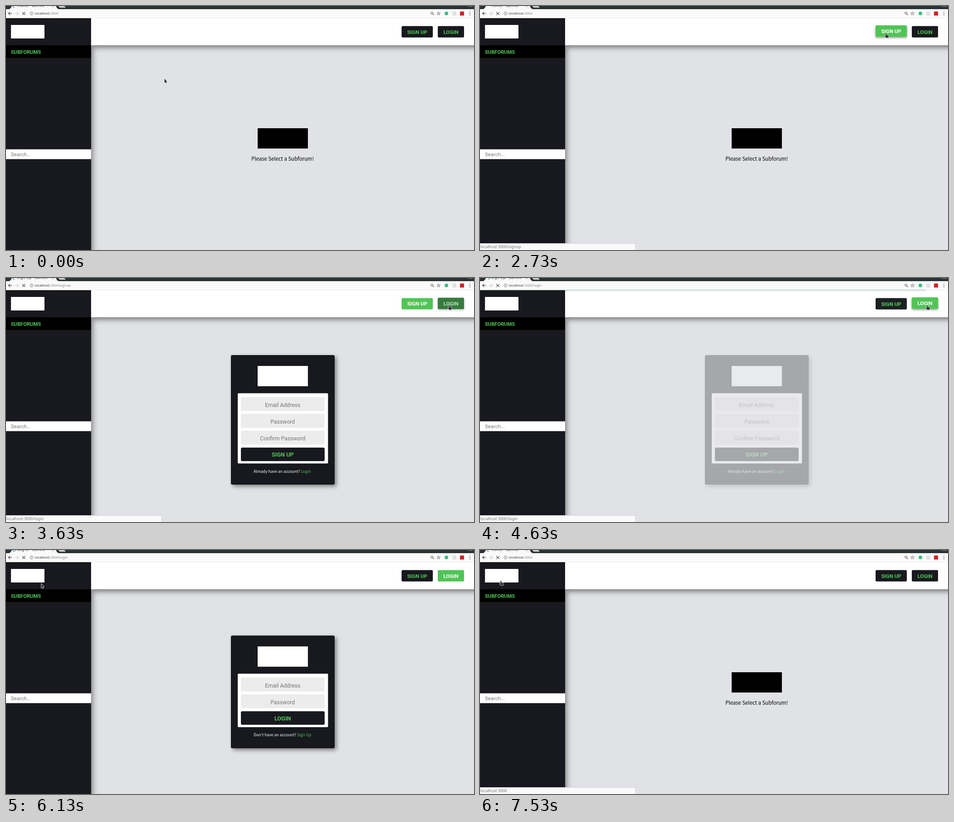
Recreate the animation shown at these times as an HTML page with a canvas. Size 1034 by 541 pixels, loop 7.56 s.

```html
<!DOCTYPE html>
<html lang="en">
<head>
<meta charset="utf-8">
<title>Forum tour</title>
<style>
html, body { margin: 0; width: 100%; height: 100%; overflow: hidden; }
canvas { display: block; width: 1034px; height: 541px; }
</style>
</head>
<body>
<canvas id="stage" width="1034" height="541"></canvas>
<script>
const W = 1034, H = 541, LOOP = 7560;
const INK = '#18191e', GREEN = '#50c556', WHITE = '#fff', GREY = '#e1e2e5';
const UI = 'Roboto, sans-serif';
const BODY = '"Noto Sans CJK JP", "Noto Sans CJK SC", "Noto Sans", sans-serif';
const CHROME = '"Noto Sans", sans-serif';

const stage = document.getElementById('stage').getContext('2d');
let c = stage;

// ---------- timing ----------
const clamp = (v, a = 0, b = 1) => Math.min(b, Math.max(a, v));

// CSS "ease": cubic-bezier(.25, .1, .25, 1)
function ease(x) {
  if (x <= 0) return 0;
  if (x >= 1) return 1;
  const bez = (s, a, b) => 3 * a * s * (1 - s) ** 2 + 3 * b * s * s * (1 - s) + s ** 3;
  let lo = 0, hi = 1;
  for (let i = 0; i < 20; i++) {
    const mid = (lo + hi) / 2;
    if (bez(mid, .25, .25) < x) lo = mid; else hi = mid;
  }
  return bez(lo, .1, 1);
}

// Level of a 200 ms transition switched on at a and off at b
function level(t, [a, b]) {
  if (t < b) return ease((t - a) / 200);
  return ease((b - a) / 200) * (1 - ease((t - b) / 200));
}
const peak = (t, spans) => Math.max(...spans.map(s => level(t, s)));
const within = (t, spans) => spans.some(([a, b]) => t >= a && t < b);

const OVER_SIGNUP = [[2170, 3490], [5030, 5070]];
const OVER_LOGIN = [[3565, 5010]];
const OVER_LOGO = [[6150, 9999]];
const LINKS = [...OVER_SIGNUP, ...OVER_LOGIN, ...OVER_LOGO];

const ROUTES = [
  { at: -9999, page: 'home', path: '', title: 'Home' },
  { at: 2740, page: 'signup', path: '/signup', title: 'Sign Up' },
  { at: 4485, page: 'login', path: '/login', title: 'Log In' },
  { at: 6485, page: 'home', path: '', title: 'Home' }
];
const STATUS = [
  [2170, 3565, '/signup'], [3565, 5030, '/login'],
  [5030, 5560, '/signup'], [6150, LOOP, '']
];

// time, x, y
const PATH = [
  [0, 350, 161], [70, 350, 161], [430, 408, 196], [800, 484, 212],
  [1150, 620, 234], [1570, 780, 200], [2000, 880, 100], [2170, 893, 70],
  [2330, 897, 60], [3250, 897, 60], [3490, 943, 61], [3565, 955, 61],
  [3630, 979, 60], [3830, 988, 60], [4900, 988, 60], [5010, 954, 62],
  [5030, 942, 63], [5070, 873, 66], [5230, 508, 76], [5440, 270, 95],
  [5640, 178, 92], [6150, 75, 74], [6400, 46, 68], [LOOP, 46, 68]
];

// Monotone cubic through PATH
function along(t, k) {
  const rate = i => (PATH[i + 1][k] - PATH[i][k]) / (PATH[i + 1][0] - PATH[i][0]);
  const slope = i => {
    if (i === 0 || i === PATH.length - 1) return 0;
    const a = rate(i - 1), b = rate(i);
    return a * b <= 0 ? 0 : 2 * a * b / (a + b);
  };
  let i = 0;
  while (i < PATH.length - 2 && t >= PATH[i + 1][0]) i++;
  const d = PATH[i + 1][0] - PATH[i][0], u = (t - PATH[i][0]) / d;
  const p = PATH[i][k], q = PATH[i + 1][k];
  return p + (q - p) * u * u * (3 - 2 * u)
    + d * u * (1 - u) * (slope(i) * (1 - u) - slope(i + 1) * u);
}

// ---------- drawing helpers ----------
function box(x, y, w, h, fill, r = 0) {
  c.fillStyle = fill;
  c.beginPath();
  c.roundRect(x, y, w, h, r);
  c.fill();
}
function text(str, x, y, font, fill, align = 'left') {
  c.font = font;
  c.fillStyle = fill;
  c.textAlign = align;
  c.fillText(str, x, y);
  return c.measureText(str).width;
}
function poly(pts, fill, stroke, lw = 1) {
  c.beginPath();
  pts.forEach(p => c.lineTo(p[0], p[1]));
  if (fill) { c.closePath(); c.fillStyle = fill; c.fill(); }
  if (stroke) { c.lineWidth = lw; c.strokeStyle = stroke; c.stroke(); }
}
function ring(x, y, r, stroke, lw, a = 0, b = 7) {
  c.beginPath();
  c.arc(x, y, r, a, b);
  c.lineWidth = lw;
  c.strokeStyle = stroke;
  c.stroke();
}
function dot(x, y, r, fill) {
  c.beginPath();
  c.arc(x, y, r, 0, 7);
  c.fillStyle = fill;
  c.fill();
}
function shaded(color, blur, dx, dy, draw) {
  c.save();
  c.shadowColor = color;
  c.shadowBlur = blur;
  c.shadowOffsetX = dx;
  c.shadowOffsetY = dy;
  draw();
  c.restore();
}
function mix(a, b, k) {
  return `rgb(${a.map((v, i) => Math.round(v + (b[i] - v) * k))})`;
}

// ---------- page contents ----------
function card(top, fields, label, ask, link) {
  const btn = top + 93 + 37.3 * fields.length;
  shaded('rgba(0,0,0,.45)', 10, 4, 4, () => box(497, top, 229, btn + 82 - top, '#08090b', 3));
  box(498, top + 1, 227, btn + 80 - top, INK, 2);
  box(556, top + 24, 111, 45, WHITE);
  box(512, top + 84.5, 199.5, btn + 35.3 - top - 84.5, WHITE, 2);
  fields.forEach((name, i) => {
    const y = top + 93 + 37.3 * i;
    box(519, y, 185, 31, '#ececec', 3);
    text(name, 611.3, y + 21.7, `12.2px ${UI}`, '#757575', 'center');
  });
  box(519, btn, 185, 30, INK, 3);
  text(label, 611.3, btn + 20.5, `bold 12.7px ${UI}`, GREEN, 'center');
  const font = `8.7px ${BODY}`;
  const w = text(ask, 547, btn + 55.6, font, WHITE);
  text(link, 547 + w, btn + 55.6, font, GREEN);
}

const PAGES = {
  home() {
    box(556, 271, 111, 45, '#000');
    text('Please Select a Subforum!', 611.3, 342.7, `11.4px ${BODY}`, '#000', 'center');
  },
  signup() {
    card(171, ['Email Address', 'Password', 'Confirm Password'], 'SIGN UP',
      'Already have an account? ', 'Login');
  },
  login() {
    card(189.8, ['Email Address', 'Password'], 'LOGIN', "Don't have an account? ", 'Sign Up');
  }
};

// Each page is painted on its own layer so that it fades as a whole
const layer = document.createElement('canvas');
layer.width = W;
layer.height = H;
const layerCtx = layer.getContext('2d');

function page(name, alpha) {
  if (alpha <= 0) return;
  c = layerCtx;
  c.clearRect(0, 0, W, H);
  PAGES[name]();
  c = stage;
  c.globalAlpha = alpha;
  c.drawImage(layer, 0, 0);
  c.globalAlpha = 1;
}

function button(label, x, w, hover, active) {
  const k = Math.max(hover, active), y = 44.5 - 1.4 * hover;
  const fill = mix([24, 25, 30], [80, 197, 86], k);
  shaded(`rgba(0,0,0,${.45 * hover})`, 5, 0, 2, () => box(x, y, w, 25.2, fill, 2.5));
  text(label, x + w / 2, y + 17, `bold 11.5px ${UI}`,
    mix([80, 197, 86], [255, 255, 255], k), 'center');
}

function frame(t) {
  box(188, 27, W - 188, H - 27, GREY);
  shaded('rgba(0,0,0,.55)', 13, 2, 0, () => box(-20, 87, 208, H, INK));
}

function header(t) {
  shaded('rgba(0,0,0,.6)', 13, 0, 3, () => box(188, 27, W - 168, 60, WHITE));
  button('SIGN UP', 874, 69, peak(t, OVER_SIGNUP), level(t, [2740, 4485]));
  button('LOGIN', 954, 58, peak(t, OVER_LOGIN), level(t, [4485, 6485]));
}

function sidebar() {
  box(0, 27, 188, H - 27, INK);
  box(11, 42, 74, 30, WHITE);
  box(0, 87, 188, 28, '#000');
  text('SUBFORUMS', 10.7, 105.9, `bold 11.2px ${UI}`, GREEN);
  box(0, 317.7, 188, 21.8, WHITE);
  text('Search...', 10.7, 333.2, `11.4px ${UI}`, '#757575');
}

// ---------- browser ----------
function spinner(t) {
  const turn = (t - clamp(t - 3830, 0, 300)) / 1000 * 5.2;
  ring(18, -1.5, 4.3, '#3d9d98', 1.3, turn + 1.2, turn + 4.2);
}

function browser(t, title, path) {
  box(0, 0, W, 7, '#2a3235');
  poly([[7, 7], [10, 5], [13, 0], [110, 0], [113, 5], [116, 7]], '#f8f8f8');
  poly([[115, 0], [129, 0], [132, 3.7], [119, 3.7]], '#c9cccd');
  spinner(t);
  text(title + ' - Lumvo', 25, 2.4, `8.7px ${CHROME}`, '#444');
  poly([[101, -2.5], [105, 1.7]], null, '#666', 1);
  poly([[105, -2.5], [101, 1.7]], null, '#666', 1);
  text('me', 1020, 2.4, `7.5px ${CHROME}`, '#c8cbcc');

  box(0, 7, W, 20, '#fafafa');
  box(0, 26.2, W, .8, '#e4e4e4');
  for (const [x, dir, color] of [[9, 1, '#444'], [24, -1, '#c8c8c8']]) {
    poly([[x + 4 * dir, 16.6], [x - 3.3 * dir, 16.6]], null, color, 1.2);
    poly([[x, 13], [x - 3.5 * dir, 16.6], [x, 20.2]], null, color, 1.2);
  }
  poly([[36, 13.3], [42.6, 19.9]], null, '#444', 1.2);
  poly([[42.6, 13.3], [36, 19.9]], null, '#444', 1.2);
  ring(56.5, 16.5, 3.4, '#666', .8);
  box(56, 16, 1, 2.6, '#666');
  box(56, 14.3, 1, 1, '#666');
  const font = `7.65px ${CHROME}`;
  const w = text('localhost', 63.7, 19.3, font, '#333');
  text(':3000' + path, 63.7 + w, 19.3, font, '#858585');

  ring(941.2, 15.8, 2.6, '#555', .9);
  poly([[943.1, 17.7], [945.6, 20.2]], null, '#555', 1.2);
  poly([[940, 15.8], [942.4, 15.8]], null, '#555', .7);
  const star = [];
  for (let i = 0; i <= 10; i++) {
    const r = i % 2 ? 1.7 : 4, a = i * Math.PI / 5 - Math.PI / 2;
    star.push([955.7 + r * Math.cos(a), 16.8 + r * Math.sin(a)]);
  }
  poly(star, null, '#555', .8);
  dot(973, 16.6, 4, '#41b883');
  box(986, 12.2, 9, 9, '#e2e2e2');
  box(1003, 12.2, 9, 9, '#d4232b');
  for (const y of [13.4, 16.6, 19.8]) dot(1025, y, .9, '#555');
}

function progress(d) {
  if (d < 0 || d > 900) return;
  const width = d < 700 ? ease(d / 200) : 1 - ease((d - 700) / 200);
  c.globalAlpha = .6 * (1 - ease((d - 500) / 400));
  box(0, 26.5, W * width, 1.1, '#3b8070');
  c.globalAlpha = 1;
}

function status(t) {
  const s = STATUS.find(([a, b]) => t >= a && t < b);
  if (!s) return;
  box(-4, 526, 348, 20, '#c4c4c6', 2);
  box(-4, 526.7, 347.3, 20, '#fafafa', 2);
  text('localhost:3000' + s[2], .8, 537.2, `8.7px ${CHROME}`, '#777');
}

function pointer(t) {
  c.save();
  c.translate(along(t, 1), along(t, 2));
  c.lineJoin = 'round';
  const shape = within(t, LINKS)
    ? [[-1, .6], [0, 0], [1, .6], [1.3, 4], [4.8, 4.8], [6, 6], [5.6, 8.5], [4.8, 10.6],
       [.3, 10.6], [-2.6, 7.2], [-2.6, 6], [-1.6, 5.8], [-.7, 6.8]]
    : [[0, 0], [0, 9.5], [2.1, 7.7], [3.6, 11], [5, 10.4], [3.6, 7.3], [6.3, 7]];
  poly([...shape, shape[0]], null, 'rgba(255,255,255,.8)', 1.4);
  poly(shape, '#36373b');
  c.restore();
}

// ---------- scene ----------
function draw(t) {
  let i = ROUTES.length - 1;
  while (t < ROUTES[i].at) i--;
  const now = ROUTES[i], old = ROUTES[Math.max(0, i - 1)];
  const d = t - now.at, swapped = d >= 320;

  frame(t);
  header(t);
  if (swapped) page(now.page, ease((d - 320) / 300));
  else page(old.page, 1 - ease((d - 20) / 300));
  sidebar();
  browser(t, (swapped ? now : old).title, now.path);
  progress(d);
  status(t);
  pointer(t);
}

const start = performance.now();
function tick() {
  draw((performance.now() - start) % LOOP);
  requestAnimationFrame(tick);
}
tick();
</script>
</body>
</html>
```
